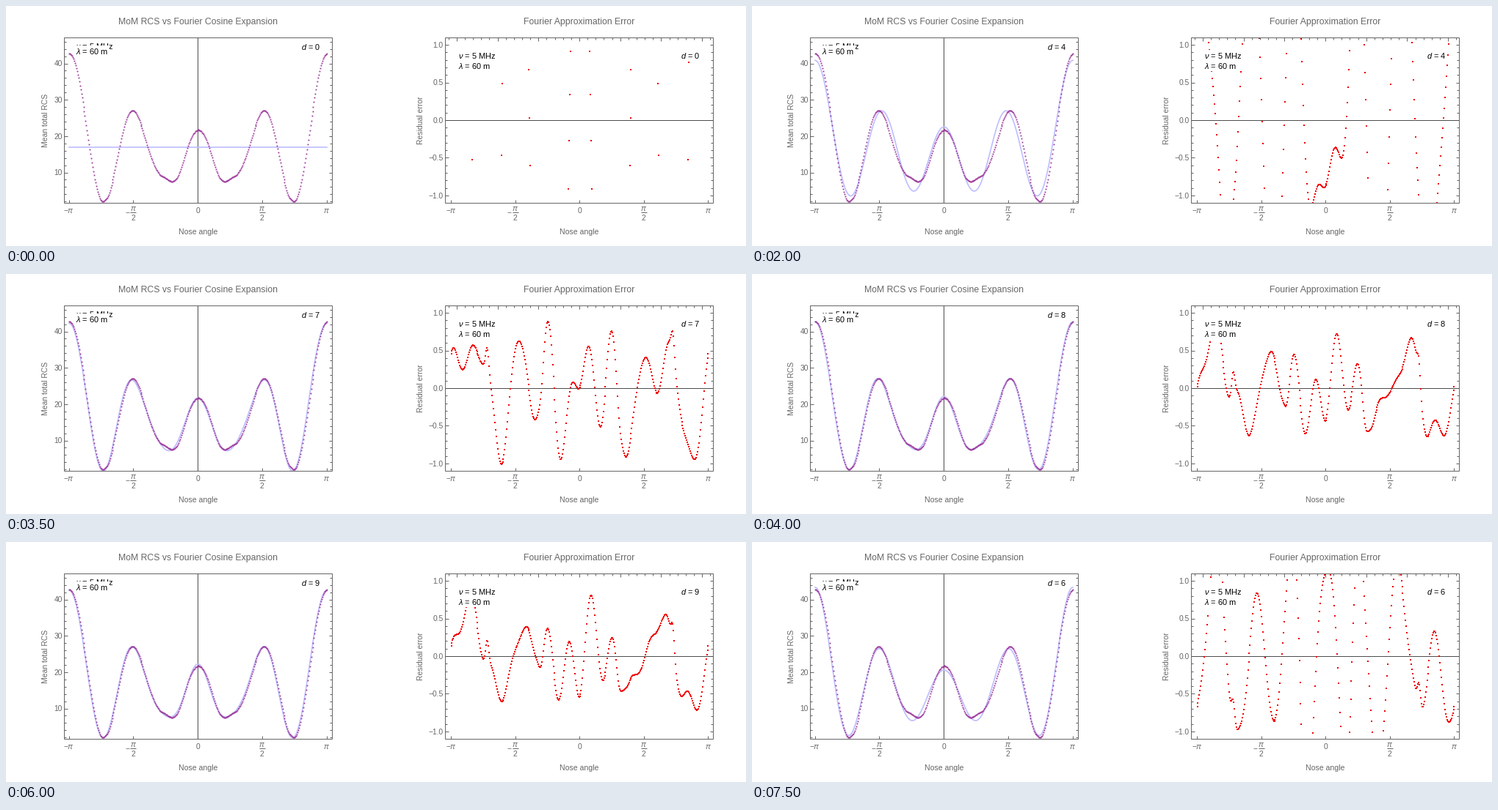
Animation of 1008x328 px, one loop 8 s. Source, as a matplotlib script:

```python
import numpy as np
import matplotlib.pyplot as plt
from matplotlib.animation import FuncAnimation
from matplotlib.patches import Rectangle

W, H, DPI = 1008, 328, 72      # at 72 dpi one point is one pixel
GRAY, AXIS = "#666666", "#4d4d4d"
TOP, BOTTOM = 43, 269

plt.rcParams.update({
    "font.family": "Liberation Sans",
    "mathtext.fontset": "custom",
    "mathtext.rm": "Liberation Sans",
    "mathtext.it": "Liberation Sans:italic",
})

# Cosine coefficients of the scattering pattern
COEFFS = np.array([17.05, -4.3, 2.5, -4.85, 12.25, -2.25, 0.25,
                   1.12, 0.435, 0.115, -0.11, -0.17, -0.08, -0.17])
SAMPLE_OFFSET = 0.5            # degrees between the samples and the grid


def cosine_sum(angle, d):
    k = np.arange(d + 1)
    return COEFFS[:d + 1] @ np.cos(np.outer(k, np.radians(angle)))


def bump(angle, center, width):
    return np.exp(-((np.abs(angle) - center) / width) ** 2)


def pattern(angle):
    """Even pattern with one narrow kink near each minimum."""
    return (cosine_sum(angle, len(COEFFS) - 1)
            - 0.25 * bump(angle, 54, 5) + 0.3 * bump(angle, 130, 3))


deg = np.arange(-180, 181)
data = pattern(deg - SAMPLE_OFFSET)


def rcs_y(v):
    return 277.7 - 4.967 * v


def error_y(v):
    return 156.5 - 102.8 * v


fig = plt.figure(figsize=(W / DPI, H / DPI), dpi=DPI, facecolor="white")
ax = fig.add_axes([0, 0, 1, 1])
ax.set(xlim=(0, W), ylim=(H, 0))
ax.axis("off")


def text(x, y, s, size=10.2, color=GRAY, ha="center", **kw):
    return ax.text(x, y, s, size=size, color=color, ha=ha, va="center", **kw)


def segment(x, y, color=GRAY):
    ax.plot(x, y, color=color, lw=1, zorder=1, solid_capstyle="butt")


def label(x, y, s, ha="left"):
    box = dict(facecolor="white", edgecolor="none", pad=1.3)
    return text(x, y, s, 11, "black", ha, bbox=box, zorder=5)


def panel(left, title, ylabel, ylabel_x, to_y, ticks, minor, fmt):
    right, mid = left + 365, left + 182.5
    ax.add_patch(Rectangle((left, TOP), right - left, BOTTOM - TOP,
                           fill=False, ec=GRAY, lw=1, zorder=4))
    text(mid, 22.3, title, 12.2)
    text(mid, 309, "Nose angle", 10.5)
    text(ylabel_x, 156.5, ylabel, 10.4, rotation=90)
    for v in minor:
        y = to_y(v) - 0.5
        size = 4.5 if np.any(np.isclose(v, ticks)) else 2.8
        segment((left, left + size), (y, y))
        segment((right - size, right), (y, y))
    for v in ticks:
        text(left - 2.2, to_y(v) + 0.3, fmt(v), ha="right")


def angle_ticks(center, half):
    for n in range(-2, 3):
        x = center + n * half / 2
        segment((x, x), (BOTTOM - 4.5, BOTTOM))
        sign = "−" if n < 0 else ""
        if n % 2:
            text(x, 277.5, "$π$")
            segment((x - 4, x + 4), (282, 282))
            text(x, 290, "2")
            text(x - 8, 282.7, sign)
        else:
            text(x + 0.5, 279.7, sign + "$π$" if n else "0")


panel(79, "MoM RCS vs Fourier Cosine Expansion", "Mean total RCS", 54,
      rcs_y, range(10, 50, 10), range(2, 48, 2), str)
panel(598, "Fourier Approximation Error", "Residual error", 565,
      error_y, np.arange(-2, 3) / 2, np.arange(-10, 11) / 10,
      lambda v: f"{v:.1f}".replace("-", "−"))
angle_ticks(261, 175.5)
angle_ticks(781, 175)
for i in range(-16, 17):
    x = 781 + i * 11.14
    segment((x, x), (TOP, TOP + (2.8 if i % 5 else 4.5)))

segment((261, 261), (TOP, BOTTOM), AXIS)
segment((598, 963), (156, 156), AXIS)

rcs_x = 261.5 + 0.975 * deg
error_x = 781.5 + 0.9722 * deg
curve, = ax.plot([], [], color="#bfbfff", lw=1.7, zorder=2)
ax.plot(rcs_x, rcs_y(data), "s", color="#993399", ms=1.8, mew=0, zorder=3)
dots, = ax.plot([], [], "s", color="#f00000", ms=2, mew=0, zorder=3)

for x, y, gap in ((95, 55.2, 6.5), (616, 67.5, 14)):
    label(x, y, "$ν$ = 5 MHz")
    label(x, y + gap, "$λ$ = 60 m")
degree_labels = [label(428, 55.5, "", "right"), label(945.5, 67.5, "", "right")]

# Climb to ten terms, rest there for two steps, then come back down
DEGREES = [*range(11), *range(10, 5, -1)]


def update(step):
    d = DEGREES[step]
    fit = cosine_sum(deg, d)
    error = data - fit
    shown = np.abs(error) <= 1.1
    curve.set_data(rcs_x, rcs_y(fit))
    dots.set_data(error_x[shown], error_y(error[shown]))
    for t in degree_labels:
        t.set_text(f"$d$ = {d}")
    return [curve, dots, *degree_labels]


anim = FuncAnimation(fig, update, frames=len(DEGREES), interval=500,
                     repeat=True, repeat_delay=0, blit=False)
plt.show()
```
